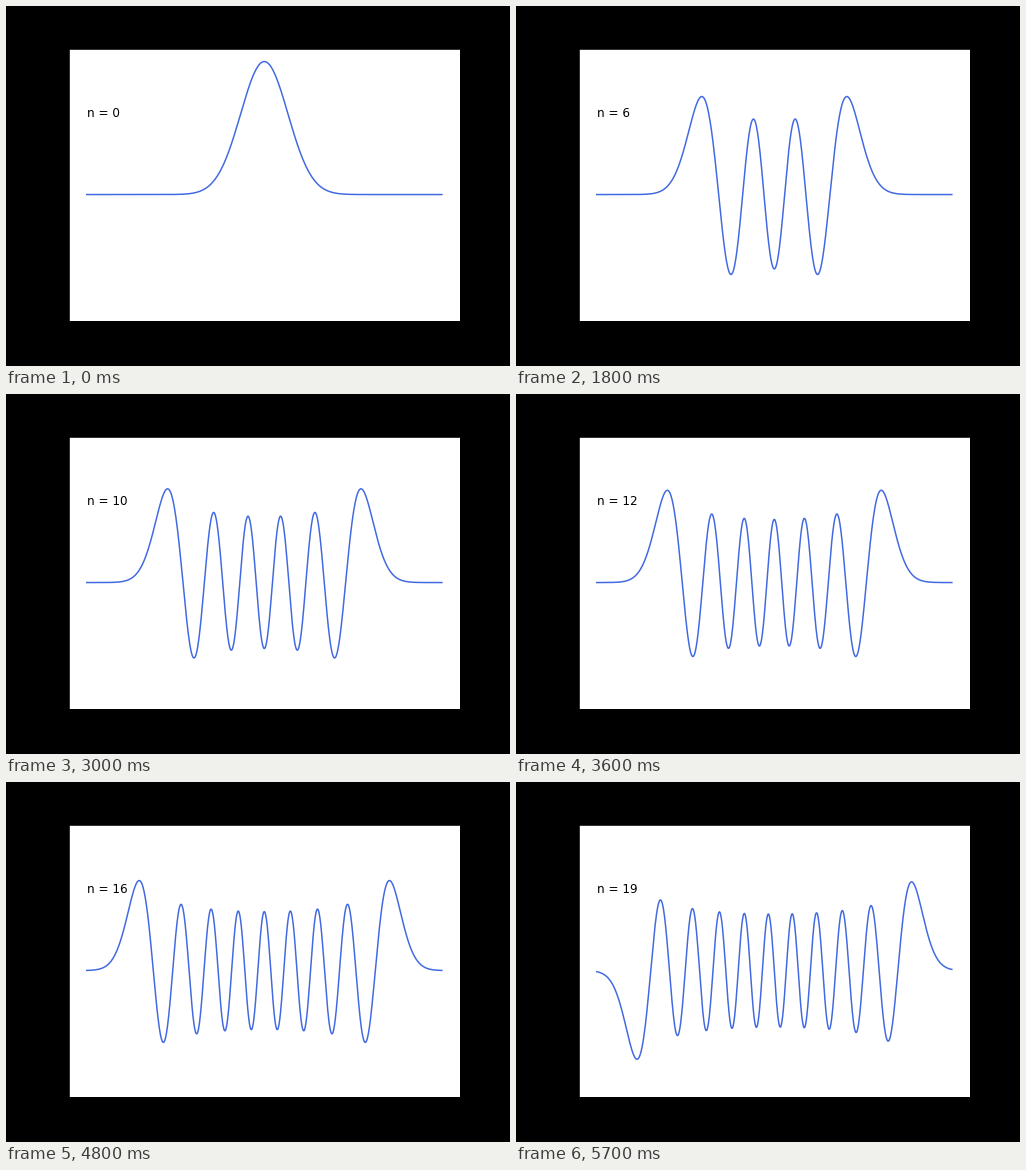
These frames come from a looping animation (504 px wide and 360 px high, 6000 ms). A matplotlib script:

```python
import numpy as np
import matplotlib.pyplot as plt
from matplotlib.animation import FuncAnimation

COUNT = 20
INTERVAL = 300


def oscillator_states(x, count):
    """Normalised Hermite functions by the three-term recurrence."""
    states = [np.pi ** -0.25 * np.exp(-x ** 2 / 2)]
    states.append(np.sqrt(2) * x * states[0])
    for n in range(1, count - 1):
        states.append(np.sqrt(2 / (n + 1)) * x * states[n]
                      - np.sqrt(n / (n + 1)) * states[n - 1])
    return np.array(states)


x = np.linspace(-7.5, 7.5, 1000)
states = oscillator_states(x, COUNT)

fig = plt.figure(figsize=(7, 5), dpi=72, facecolor="black")
fig.subplots_adjust(left=0.125, right=0.9, bottom=0.125, top=0.88)
ax = fig.add_subplot()
ax.set(xticks=[], yticks=[])

low, high = states.min(), states.max()
pad = 0.05 * (high - low)
ax.set_xlim(-8.25, 8.25)
ax.set_ylim(low - pad, high + pad)

line, = ax.plot(x, states[0], color="royalblue", lw=1.5)
label = ax.text(-7.5, 0.44, "n = 0", family="DejaVu Sans", size=12)


def update(n):
    line.set_ydata(states[n])
    label.set_text(f"n = {n}")
    return line, label


anim = FuncAnimation(fig, update, frames=COUNT, interval=INTERVAL,
                     repeat=True, repeat_delay=0)
plt.show()
```
